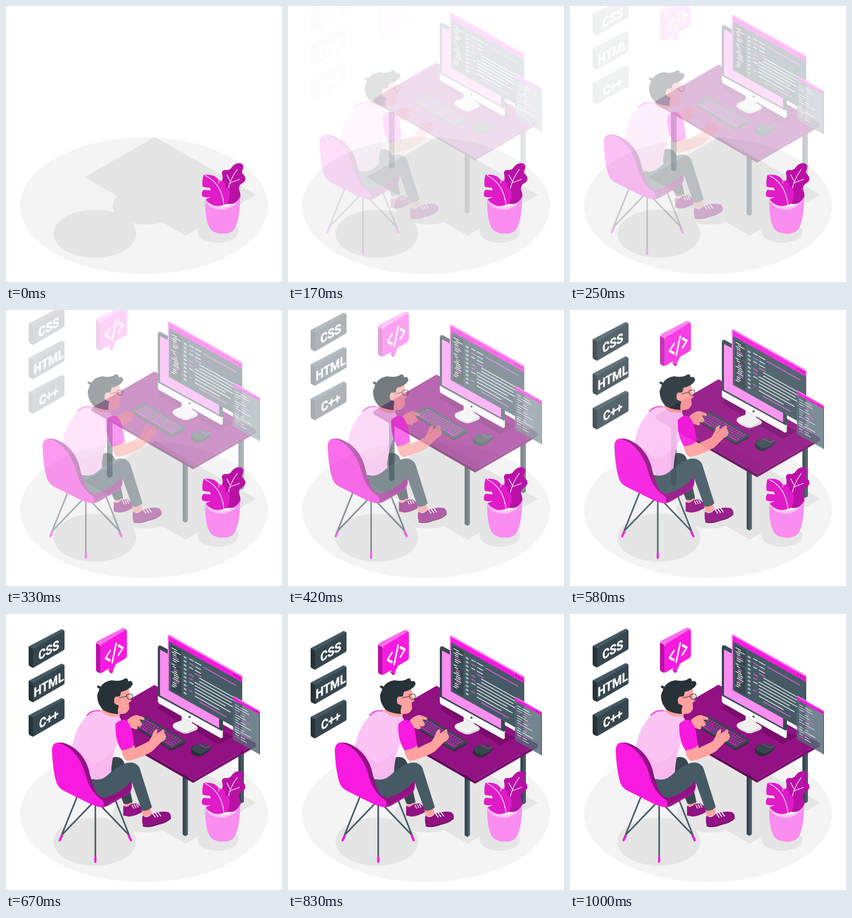
An HTML page for the animation above (1.04 s loop, 500 px wide and 500 px high).

```html
<!DOCTYPE html>
<html lang="en">
<head>
<meta charset="utf-8">
<style>
html, body { margin: 0; width: 100%; height: 100%; overflow: hidden; background: #fff; }
svg { display: block; width: 100vw; height: 100vh; }
text { font: 700 23px Roboto, Arial, sans-serif; fill: #fff; stroke: #fff; stroke-width: .5; text-anchor: middle; }
.line { fill: none; stroke-linecap: round; stroke-linejoin: round; }
</style>
</head>
<body>
<svg viewBox="0 0 500 500">
  <ellipse cx="250" cy="362" rx="224.5" ry="124" fill="#f4f4f4"/>
  <g fill="#e5e5e5">
    <path d="M142 310L270 237L453 342L325 416Z"/>
    <ellipse cx="253" cy="362" rx="60" ry="34"/>
    <ellipse cx="161" cy="412.500" rx="75" ry="43.500"/>
    <ellipse cx="384" cy="409" rx="37" ry="20"/>
  </g>

  <g id="desk">
    <!-- legs and table top -->
    <path fill="#37474f" d="M183 200h5v121l-5-3zM320 285h5v117l-5-3zM421 240h5v103l-5-3z"/>
    <path fill="#455a64" d="M188 200h5v118l-5 3zM325 285h4.500v114l-4.500 3zM426 240h5v100l-5 3z"/>
    <path fill="#63095a" d="M155 194L339 300V305.500L155 199.500Z"/>
    <path fill="#7d0e71" d="M339 300L453 234V239.500L339 305.500Z"/>
    <path fill="#921183" d="M155 194L269 128L453 234L339 300Z"/>
    <path fill="#790c6c" d="M273 170L290 161L411 222L385 236L348 214L330 205Z"/>

    <!-- monitor -->
    <path fill="#f0f0f0" d="M302 204Q301 198 308 196L318 192V180L337 190V197L345 202Q350 206 344 210L331 215Q324 217 317 213Z"/>
    <path fill="#d9d9d9" d="M302 202Q303 206 317 211Q324 215 331 212L347 204Q349 208 344 210L331 215Q324 218 317 214Q302 208 302 202ZM318 182L337 192V196L318 186Z"/>
    <path fill="#37474f" d="M275 62Q275 55 281 57L389 117Q393 120 393 125V213L275 149Z"/>
    <path fill="#fa8df0" d="M279 66Q279 64 281 65L386 122V206L279 147Z"/>
    <path fill="#fafafa" d="M275 148L390 211V225L278 162Q275 160 275 157Z"/>
    <path fill="#dedede" d="M390 211L393 210V223L390 225Z"/>
    <circle cx="332.500" cy="186" r="2" fill="#455a64"/>

    <!-- keyboard -->
    <path fill="#263238" d="M228 198L300 241L324 230V234L300 247L229 203Z"/>
    <path fill="#37474f" d="M250 186Q252 185 254 186L323 227Q326 230 323 232L302 243Q299 244 297 243L229 201Q227 198 230 196Z"/>
    <g id="keys" class="line" stroke="#d81bc2" stroke-width="2.600" transform="matrix(1 .577 -1 .577 252 188)" style="stroke-linecap:butt"/>

    <!-- mouse -->
    <path fill="#263238" d="M335 244Q338 237 350 235L363 236Q374 239 371 244Q364 252 351 258Q338 257 335 250Z"/>
    <path fill="#37474f" d="M336 243Q341 236 354 234Q368 236 372 241Q365 248 353 253Q341 251 336 243Z"/>
    <path class="line" stroke="#e01cc8" stroke-width="1.200" d="M351 236L362 242L370 238"/>

    <!-- editor windows -->
    <g transform="matrix(1 .56 0 1 293 38)">
      <path fill="#455a64" d="M0 0H135V99H0Z"/>
      <path fill="#37474f" d="M6 14H25V44H6ZM6 47H25V96H6Z"/>
      <path fill="#f81ae0" d="M0 0H135V10H0Z"/>
      <path fill="#fb7fee" d="M0 0L3 -2.500H135V.5H2V99H0Z"/>
      <path fill="#921183" d="M119 3h2.500v3h-2.500zM124 3h2.500v3h-2.500zM129 3h2.500v3h-2.500z"/>
      <g id="code"/>
    </g>
    <g transform="matrix(1 .56 0 1 411 149)">
      <path fill="#546a74" opacity=".82" d="M0 0H49V78H0Z"/>
      <path fill="#37474f" d="M48 0H49V78H48Z"/>
      <path fill="#f81ae0" d="M0 0H49V6H0Z"/>
      <path fill="#fb7fee" d="M0 0L2 -1.500H49V.5H0Z"/>
      <path fill="#921183" d="M38 2h2v2h-2zM42 2h2v2h-2zM46 2h1.500v2h-1.500z"/>
      <g id="notes"/>
    </g>
  </g>

  <g id="labels">
    <g id="plates"/>
    <path fill="#fb6fec" d="M163 53Q163 50 166 48L211 25Q214 24 219 28L173 57Z"/>
    <path fill="#b911a6" d="M163 52L171 56V107L165 104Q163 103 163 100ZM184 99L190 107L195 104Z"/>
    <path fill="#f81ae0" d="M171 59Q171 56 174 54L215 29Q219 27 219 31V75Q219 78 216 80L199 90L192 106L186 98L175 105Q171 108 171 103Z"/>
    <path class="line" stroke="#fff" stroke-width="3.800" transform="matrix(.866 -.5 0 1 196 70)" d="M-9 -8L-18 0L-9 9M4 -15L-4 15M9 -9L18 0L9 8"/>
  </g>

  <g id="coder">
    <!-- far hand, far leg -->
    <path fill="#ffa19e" d="M219 192Q229 183 237 183L249 187Q252 190 249 192L241 191Q246 197 246 201L242 204L237 203Q240 208 235 209Q228 207 223 205Z"/>
    <path fill="#37474f" d="M186 264Q194 257 205 260Q213 263 215 274L229 341Q222 347 213 344L195 300Z"/>
    <path fill="#ffa19e" d="M214 344Q221 346 226 341L229 350L220 358L214 352Z"/>
    <path fill="#921183" d="M212 347Q218 353 226 344L236 343L246 350V359Q234 366 222 367L212 365Z"/>
    <path class="line" stroke="#fff" stroke-width="1.500" d="M228 346L231 352M232 345L235 351M236 345L239 350"/>

    <!-- near leg -->
    <path fill="#ffa19e" d="M245 354Q255 357 261 351L264 361Q258 368 248 366Z"/>
    <path fill="#921183" d="M247 365Q255 372 264 362Q281 356 294 359Q300 364 298 370Q291 378 274 382Q258 388 248 384Q245 375 247 365Z"/>
    <path class="line" stroke="#fff" stroke-width="1.700" d="M265 361L270 368M270 360L275 367M275 359L280 366"/>
    <path class="line" stroke="#5f0a56" stroke-width="1.600" d="M248 384Q258 387.500 273 381.500Q291 378 298 370"/>
    <path fill="#455a64" d="M150 300Q180 296 199 280Q213 269 226 269Q238 270 242 280L264 350Q256 358 246 356L228 306Q209 322 185 332L160 334Z"/>

    <!-- torso -->
    <path fill="#f81ae0" d="M145 184Q153 173 168 174L178 179L150 190Z"/>
    <path fill="#ffa19e" d="M176 164L208 172L205 188L185 193L171 178Z"/>
    <path fill="#fcc3f5" d="M148 183Q160 172 174 177Q185 189 204 185Q214 195 207 223Q192 249 190 286Q173 304 158 299Q145 272 121 252Q117 240 127 213Q136 194 148 183Z"/>
    <path fill="#f9b8f0" d="M120 235Q140 258 158 270Q178 266 193 245Q188 270 190 286Q173 304 158 299Q145 272 121 252Z"/>
    <path fill="#ffa19e" d="M208 244L231 237Q234 241 233 243L258 231Q264 223 267 213Q272 208 274 209L273 217L284 209Q288 209 286 214L290 222Q289 229 281 232L264 249Q244 261 221 266Q212 266 208 244Z"/>
    <path fill="#f81ae0" d="M198 199Q207 190 216 192Q224 197 228 212L232 238Q222 246 209 247Q199 232 198 211Z"/>
    <path class="line" stroke="#e97f7d" stroke-width="1" d="M273 218L269 224M278 214L284 213"/>

    <!-- head -->
    <path fill="#ffa19e" d="M196 142L222 136L224 149L227 157L222 161L223 171Q220 181 209 181L198 181L188 166Z"/>
    <path fill="#263238" d="M171 132Q177 122 191 120Q207 123 215 117Q220 115 221 122Q229 119 229 128Q223 138 208 141L206 149L200 150Q194 154 196 162L204 166Q201 176 203 181Q190 181 177 175Q164 163 165 146L169 136L164 132Q167 127 171 132Z"/>
    <ellipse cx="200.500" cy="157" rx="5" ry="7.500" fill="#ffa19e" transform="rotate(-10 200 157)"/>
    <path class="line" stroke="#263238" stroke-width="1.100" d="M205 152L218 149M218 147Q224 143 228 146Q230 152 225 155Q218 155 218 147"/>

    <!-- chair -->
    <g class="line" stroke="#455a64" stroke-width="2.800">
      <path d="M161.500 346V448M128 332L97 409M154 345L102 399M198 338L226 409M171 347L221 399"/>
      <path stroke="#f81ae0" stroke-width="4" d="M161.500 441V449M101 402L97 410M222 402L226 410"/>
    </g>
    <path fill="#921183" d="M87 236Q97 229 113 237Q139 250 149 280Q155 304 163 323Q170 336 184 331Q205 325 227 303Q230 319 221 326L183 348Q176 351 168 349Z"/>
    <path fill="#f81ae0" d="M83 250Q82 236 91 233Q105 234 120 248Q137 266 144 292Q151 322 174 337Q180 345 174 350Q164 350 148 342L102 319Q92 313 89 298Q84 276 83 250Z"/>
    <path class="line" stroke="#b911a6" stroke-width="1.500" d="M176 349L221 325Q228 319 227 306"/>
  </g>

  <!-- plant -->
  <path fill="#fdc6f8" d="M361 350Q371 342 392 343Q414 341 424 346L423 356Q402 374 376 368L361 357Z"/>
  <path fill="#fff" d="M380 354L412 352Q411 362 393 364L378 361Z"/>
  <path fill="#b911a6" d="M425 285Q432 287 429 296Q425 302 431 306Q437 314 430 320Q421 324 422 332Q427 343 423 351Q414 361 398 358L391 318Q394 312 391 303Q391 297 398 297Q406 298 409 292Q416 283 425 285Z"/>
  <path class="line" stroke="#fff" stroke-width="1.200" d="M419 296Q407 312 403 330M400 306L406 317M405 321L423 314"/>
  <path fill="#e01cc8" d="M358 306Q378 303 386 316L384 323L388 316Q396 318 398 325L396 331L401 328Q406 333 405 346Q403 360 393 361Q380 365 370 358Q363 354 362 350L372 346Q359 348 355 344Q354 336 358 333L371 334L369 329Q361 329 356 327Q355 313 358 306Z"/>
  <path class="line" stroke="#fff" stroke-width="1.300" d="M361 307Q391 322 395 361"/>
  <path fill="#fdc6f8" d="M361 351Q366 363 393 364Q416 362 424 346L422 362L393 372L363 364Z"/>
  <path fill="#fa8df0" d="M361 351Q365 367 393 369Q416 366 424 346Q424 385 415 402Q410 412 393 412.500Q375 412 369 402Q360 386 361 351Z"/>
</svg>
<script>
const $ = id => document.getElementById(id);
const PINK = '#fb5fea', WHITE = '#f5f5f5';

// Deterministic noise for line lengths
const noise = n => { const s = Math.sin(n * 12.9898) * 43758.5453; return s - Math.floor(s); };
const bar = (x, y, w, h, color) =>
  `<rect x="${x}" y="${y}" width="${w}" height="${h}" fill="${color}"/>`;

function bigCode() {
  let out = '';
  for (let i = 0; i < 20; i++) {
    if (i === 7) continue;
    const indent = 7 + Math.floor(noise(i) * 3) * 2;
    out += bar(indent, 18 + i * 3.6, 5 + noise(i + 40) * 8, 1.5, i % 6 === 4 ? PINK : WHITE);
  }
  for (let i = 0; i < 10; i++) out += bar(29, 21 + i * 7.2, 5, 3.2, '#b0bec5');
  // Each row: x, y, width, pink
  [[39, 20, 8], [49, 20, 12], [64, 21, 60, 1], [39, 28, 9, 1], [50, 28, 10],
   [39, 35, 7], [49, 35, 11], [49, 41, 12, 1], [39, 48, 8, 1], [57, 45, 62],
   [57, 51, 66], [39, 55, 7, 1], [49, 57, 67], [49, 63, 72], [39, 62, 8],
   [49, 69, 56], [49, 75, 65], [39, 77, 6, 1], [49, 82, 45], [57, 88, 50, 1]]
    .forEach(([x, y, w, pink]) => out += bar(x, y, w, 1.5, pink ? PINK : WHITE));
  return out;
}

function smallCode() {
  let out = '';
  for (let i = 0; i < 14; i++) {
    const y = 12 + i * 4.4;
    out += bar(4, y, 4 + noise(i + 9) * 6, 1.1, i % 5 === 3 ? PINK : WHITE);
    out += bar(14, y, 6 + noise(i + 70) * 18, 1.1, i % 3 === 2 ? PINK : WHITE);
  }
  return out;
}

const plate = (name, i) => `<g transform="translate(0 ${i * 62.3})">
  <path fill="#455a64" d="M41 58L100 27Q102 26 106 30L49 63Z"/>
  <path fill="#263238" d="M41 58L49 62V97L43 94Q41 93 41 90Z"/>
  <path fill="#37474f" d="M49 64Q49 62 51 61L104 30Q106 29 106 31V62Q106 64 104 65L49 97Z"/>
  <text transform="matrix(.866 -.5 0 1 77.5 72.5)">${name}</text></g>`;

$('code').innerHTML = bigCode();
$('notes').innerHTML = smallCode();
$('plates').innerHTML = ['CSS', 'HTML', 'C++'].map(plate).join('');
$('keys').innerHTML = [3, 7, 11, 15, 19].map((y, i) =>
  `<path d="M${2 + i % 2} ${y}H70" stroke-dasharray="${i === 4 ? '3 1.5 18 1.5' : '3 1.5'}"/>`).join('');

// Cubic bezier easing (.36, -.01, .5, 1.38)
const cubic = (s, a, b) => 3 * (1 - s) ** 2 * s * a + 3 * (1 - s) * s * s * b + s ** 3;
function ease(x) {
  let lo = 0, hi = 1;
  for (let i = 0; i < 24; i++) {
    const mid = (lo + hi) / 2;
    if (cubic(mid, .36, .5) < x) lo = mid; else hi = mid;
  }
  return cubic(hi, -.01, 1.38);
}

function place(id, dx, dy, p, alpha) {
  $(id).setAttribute('transform', `translate(${dx * (p - 1)} ${dy * (p - 1)})`);
  $(id).setAttribute('opacity', alpha);
}

const LOOP = 1040, LEAD = 25, start = performance.now();
function draw() {
  const t = (performance.now() - start) % LOOP;
  const p = t < 40 ? 0 : ease(Math.min(1, (t + LEAD) / 1000));
  const alpha = Math.max(0, Math.min(1, p));
  place('desk', 0, 30, p, alpha);
  place('coder', 30, 0, p, alpha);
  // The labels slide and fade twice as strongly
  place('labels', 0, 60, p, alpha * alpha);
  requestAnimationFrame(draw);
}
draw();
</script>
</body>
</html>
```
